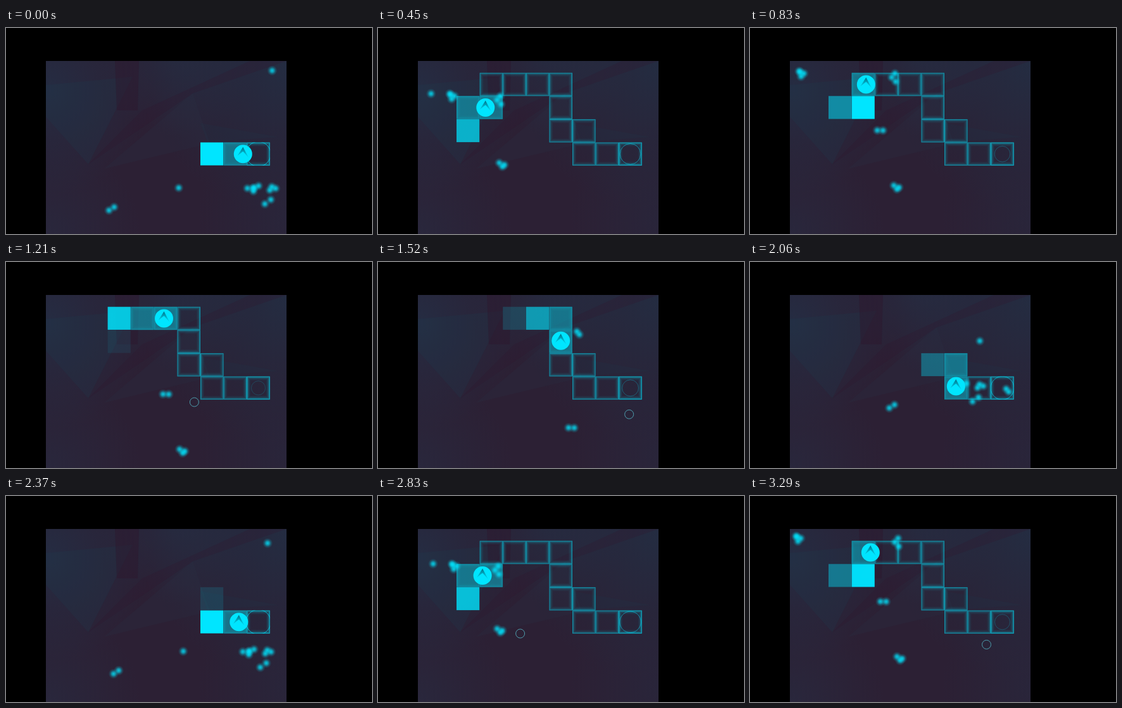
Recreate the animation shown at these times as an HTML page with a canvas. Size 578x325 px, loop 3.37 s.

```html
<!DOCTYPE html>
<html lang="en">
<head>
<meta charset="utf-8">
<title>Path game</title>
<style>
html, body { margin: 0; width: 100%; height: 100%; overflow: hidden; background: #000; }
canvas { display: block; }
</style>
</head>
<body>
<canvas id="stage" width="578" height="325"></canvas>
<script>
const ctx = document.getElementById('stage').getContext('2d');
const LOOP = 3370, FRAMES = 44, FRAME = LOOP / FRAMES;
const ROUND = 2410, RESET = 165, SWIPE = 1833;
const PANEL = [63, 52, 380, 273];
const SIZE = 36.6, HALF = SIZE / 2;
const SPEED = 26;      // spark pixels per unit of progress, on each axis
const SLOW_FROM = 9, SLOW = .64;   // the ball slows on the last tiles

const DIRS = { u: [0, -1], d: [0, 1], l: [-1, 0], r: [1, 0],
  ul: [-1, -1], ur: [1, -1], dl: [-1, 1], dr: [1, 1] };

const cyan = a => `rgba(0,229,255,${a})`;
const clamp = v => Math.max(0, Math.min(1, v));
const noise = n => (Math.sin(n * 127.1) * 43758.5 % 1 + 1) % 1 - .5;

// Walk the path: each run of moves in one direction is one straight stretch.
// "ahead" counts the straight moves left; such tiles flash a little later.
const tiles = [];
let tx = 124, ty = 143.9;
for (const run of ['u', 'r', 'u', 'rrr', 'dd', 'r', 'd', 'rr']) {
  const [dx, dy] = DIRS[run[0]];
  for (let k = 0; k < run.length; k++) {
    tiles.push({ x: tx, y: ty, ahead: run.length - 1 - k });
    tx += dx * SIZE;
    ty += dy * SIZE;
  }
}
tiles.push({ x: tx, y: ty, ahead: 0 });
const GOAL = tiles.length - 1;

// Time since the reset to game progress; the pace is uneven.
const pace = [[0, 0], [250, 1.62], [665, 3.1], [1045, 4.88], [1665, 9], [2205, 12.4], [ROUND, 13.7]];

function progress(t) {
  const s = (t - RESET + ROUND) % ROUND;
  const i = pace.findIndex(k => k[0] > s);
  const [a, b] = pace[i - 1], [c, d] = pace[i];
  return b + (d - b) * (s - a) / (c - a);
}

const toPath = q => q < SLOW_FROM ? Math.max(0, q) : SLOW_FROM + (q - SLOW_FROM) * SLOW;
const toProgress = p => p < SLOW_FROM ? p : SLOW_FROM + (p - SLOW_FROM) / SLOW;

function ballAt(q) {
  const p = Math.min(GOAL, toPath(q)), i = Math.min(Math.floor(p), GOAL - 1);
  const a = tiles[i], b = tiles[i + 1], f = p - i;
  return [a.x + (b.x - a.x) * f + HALF, a.y + (b.y - a.y) * f + HALF];
}

// Sparks leave the ball along a diagonal: progress, direction, count.
const bursts = [
  [-.5, 'ul', 1], [-.2, 'dr', 3], [-.1, 'ur', 3], [.75, 'ul', 4], [1.9, 'dr', 2],
  [6, 'dr', 2], [7.9, 'dl', 2], [8.25, 'dr', 2], [9, 'ur', 1], [9, 'dr', 3],
  [10, 'dr', 3], [10.3, 'dr', 2], [10.6, 'dl', 1]
];
const sparks = bursts.flatMap(([born, dir, count], b) =>
  Array.from({ length: count }, (_, i) => {
    const [x, y] = ballAt(born), spread = count > 1 ? 14 : 0, seed = b * 9 + i;
    return { born, dir: DIRS[dir], x: x + spread * noise(seed + 1), y: y + spread * noise(seed + 5) };
  }));

function poly(fill, ...p) {
  ctx.fillStyle = fill;
  ctx.beginPath();
  for (let i = 0; i < p.length; i += 2) ctx.lineTo(p[i], p[i + 1]);
  ctx.fill();
}

function glow(x, y, r, ...stops) {
  const g = ctx.createRadialGradient(x, y, 0, x, y, r);
  stops.forEach((c, i) => g.addColorStop(i / (stops.length - 1), c));
  ctx.fillStyle = g;
  ctx.fillRect(x - r, y - r, 2 * r, 2 * r);
}

function ring(x, y, r, color) {
  ctx.strokeStyle = color;
  ctx.lineWidth = 1;
  ctx.beginPath();
  ctx.arc(x, y, r, 0, 7);
  ctx.stroke();
}

function backdrop() {
  ctx.fillStyle = '#2c2034';
  ctx.fillRect(...PANEL);
  glow(63, 95, 170, 'rgba(30,56,80,.5)', 'rgba(30,56,80,0)');
  glow(443, 60, 230, 'rgba(28,56,78,.5)', 'rgba(28,56,78,0)');
  glow(63, 325, 150, 'rgba(38,46,68,.5)', 'rgba(38,46,68,0)');
  glow(443, 300, 140, 'rgba(38,42,64,.5)', 'rgba(38,42,64,0)');
  glow(270, 40, 130, 'rgba(34,50,72,.5)', 'rgba(34,50,72,0)');
  poly('rgba(30,62,80,.22)', 63, 90, 200, 77, 130, 215, 63, 140);
  poly('rgba(46,20,44,.4)', 172, 52, 210, 52, 208, 130, 175, 130);
  poly('rgba(46,24,46,.3)', 215, 130, 385, 52, 443, 52, 295, 103, 130, 215);
  poly('rgba(40,50,72,.2)', 295, 103, 322, 182, 155, 222);
  poly('rgba(30,60,78,.16)', 307, 150, 430, 172, 318, 180);
}

function outline({ x, y }, alpha) {
  ctx.lineWidth = 1;
  for (let i = 0; i < 6; i++) {
    ctx.strokeStyle = cyan(.56 * alpha * Math.exp(-i * .55));
    ctx.strokeRect(x + .5 + i, y + .5 + i, SIZE - 1 - 2 * i, SIZE - 1 - 2 * i);
  }
}

function fill({ x, y }, alpha) {
  ctx.fillStyle = cyan(alpha);
  ctx.fillRect(x, y, SIZE - .4, SIZE - .4);
}

function drawTiles(q) {
  tiles.forEach((tile, i) => {
    const since = q - toProgress(i + .95 + .2 * tile.ahead);
    if (since >= 0) return fill(tile, clamp(1 - (since - .3) * .55));
    const entered = toPath(q) >= i - .5;
    if (entered) fill(tile, .4);
    outline(tile, clamp(q * 2) * (entered ? .5 : i === GOAL ? 1.3 : 1));
  });
}

function drawGoal(t) {
  const wave = Math.cos((t + 60) / ROUND * 2 * Math.PI);
  const { x, y } = tiles[GOAL];
  ctx.save();
  ctx.beginPath();
  ctx.rect(x, y, SIZE, SIZE);
  ctx.clip();
  ring(x + HALF, y + HALF, 15.3 + 4.3 * wave, cyan(.42 + .25 * wave));
  ctx.restore();
}

function drawBall(q) {
  ctx.save();
  ctx.translate(...ballAt(q));
  ctx.fillStyle = cyan(1);
  ctx.beginPath();
  ctx.arc(0, 0, 14.5, 0, 7);
  ctx.fill();
  const shade = ctx.createLinearGradient(0, -11, 0, 6);
  shade.addColorStop(0, 'rgba(0,70,90,.75)');
  shade.addColorStop(1, 'rgba(0,120,140,.1)');
  poly(shade, 0, -11, 9, 6, 0, -4, -9, 3);
  ctx.restore();
}

function drawSparks(q) {
  for (const { born, dir, x, y } of sparks) {
    const d = (q - born) * SPEED;
    if (d > 0) glow(x + dir[0] * d, y + dir[1] * d, 8, cyan(.85), cyan(.6), cyan(.2), cyan(0));
  }
}

// A small ring sweeps to the right along a shallow curve.
function drawPointer(t) {
  const u = t % SWIPE, d = u - SWIPE * .544;
  if (u > SWIPE / 2) ring(226 + d * .324, 217 + d * d * 8.4e-5, 7, 'rgba(86,185,200,.8)');
}

function draw(t) {
  const q = progress(t);
  ctx.fillStyle = '#000';
  ctx.fillRect(0, 0, 578, 325);
  ctx.save();
  ctx.beginPath();
  ctx.rect(...PANEL);
  ctx.clip();
  backdrop();
  drawTiles(q);
  drawGoal(t);
  drawSparks(q);
  drawBall(q);
  drawPointer(t);
  ctx.restore();
}

const start = performance.now();
function tick() {
  const t = (performance.now() - start) % LOOP;
  const step = Math.min(FRAMES - 1, Math.floor((t + 17) / FRAME));
  draw(Math.max(0, step * FRAME - 8));
  requestAnimationFrame(tick);
}
tick();
</script>
</body>
</html>
```
